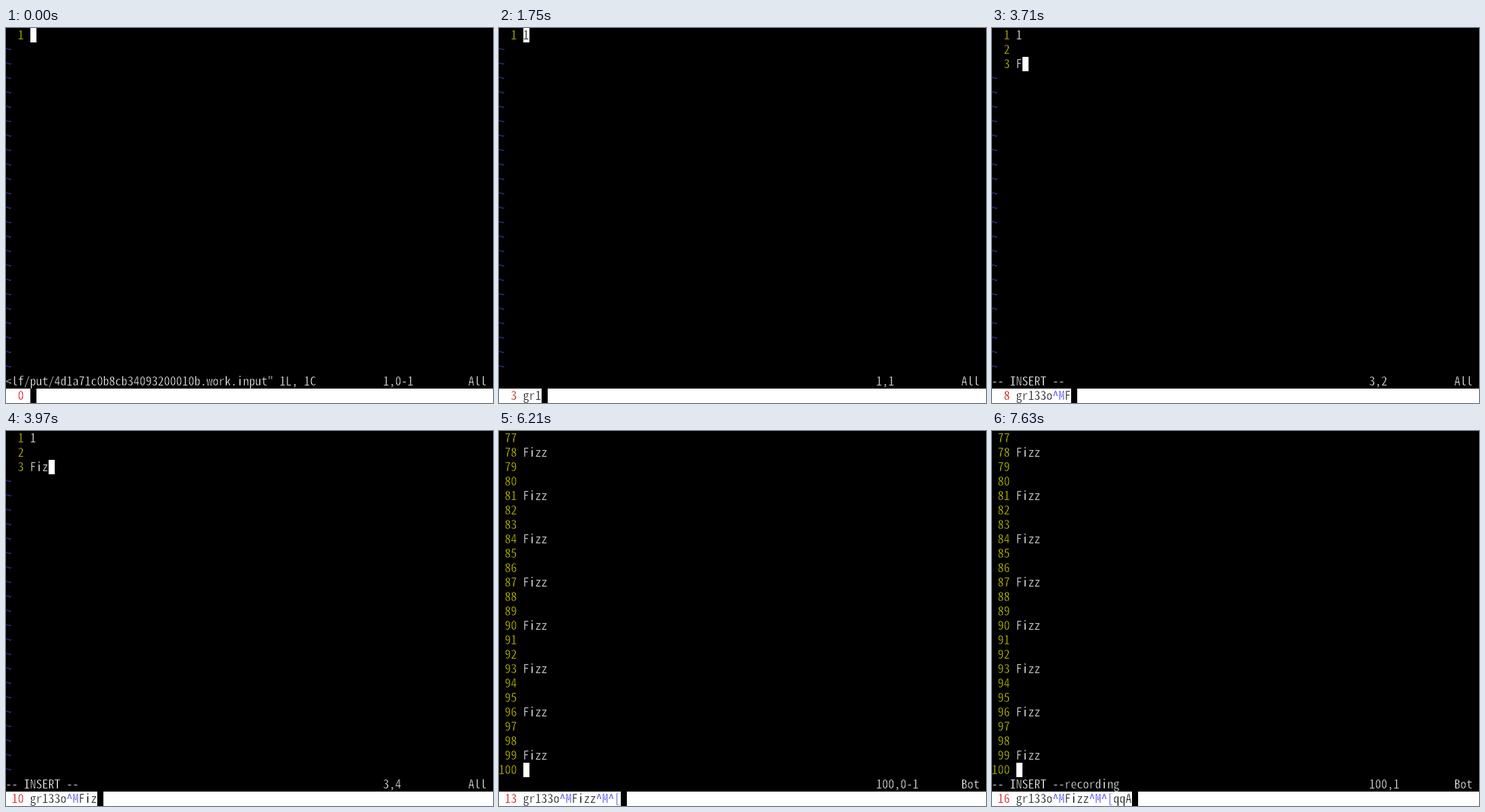
These frames come from a looping animation (640 by 494 pixels, 8 s). An HTML page:

```html
<!DOCTYPE html>
<html lang="en">
<head>
<meta charset="utf-8">
<title>Terminal editor</title>
<style>
  html, body { margin: 0; width: 100%; height: 100%; overflow: hidden; background: #000; }
  svg { display: block; width: 100%; height: 100%; }
  text {
    font: 16px "Noto Sans Mono CJK JP", "Noto Sans Mono", "DejaVu Sans Mono", monospace;
    font-size-adjust: ch-width 0.5;
    font-variant-ligatures: none;
    white-space: pre;
    stroke-width: 0.4px; /* stroked in the paper colour to thin the letters */
  }
</style>
</head>
<body>
<svg id="screen" viewBox="0 0 640 494"></svg>
<script>
const LOOP = 8000, CELL_W = 8, CELL_H = 19, INSET = -0.5, BASELINE = 15;
const BUFFER_ROWS = 24, STATUS_ROW = 24, KEY_ROW = 25, TEXT_COL = 4;
const WHITE = '#fff', BLACK = '#000', YELLOW = '#cdcd00', RED = '#cd0000',
      BLUE = '#0000ee', TILDE = '#5c5cff';

const KEYS = ['g', 'r', '1', '3', '3', 'o', '^M', 'F', 'i', 'z', 'z', '^M', '^[', 'q', 'q', 'A'];
const FILE = '<lf/put/4d1a71c0b8cb34093200010b.work.input" 1L, 1C';
const INSERT = '-- INSERT --';

// time, keys typed, line count, text of last line, message, pending command, position
const STEPS = [
  [0, 0, 1, '', FILE, '', '1,0-1'],
  [1270, 1, 1, '', FILE, 'g', '1,0-1'],
  [1560, 2, 1, '', FILE, 'gr', '1,0-1'],
  [1750, 3, 1, '1', '', '', '1,1'],
  [2120, 4, 1, '1', '', '3', '1,1'],
  [2310, 5, 1, '1', '', '33', '1,1'],
  [2710, 6, 2, '', INSERT, '', '2,1'],
  [3300, 7, 3, '', INSERT, '', '3,1'],
  [3710, 8, 3, 'F', INSERT, '', '3,2'],
  [3850, 9, 3, 'Fi', INSERT, '', '3,3'],
  [3970, 10, 3, 'Fiz', INSERT, '', '3,4'],
  [4170, 11, 3, 'Fizz', INSERT, '', '3,5'],
  [4800, 12, 4, '', INSERT, '', '4,1'],
  [5200, 13, 4, '', '', '^[', ''],
  [6210, 13, 100, '', '', '', '100,0-1'],
  [7030, 14, 100, '', '', 'q', '100,0-1'],
  [7220, 15, 100, '', 'recording', '', '100,0-1'],
  [7630, 16, 100, '', INSERT + 'recording', '', '100,1']
];

const screen = document.getElementById('screen');

function add(tag, attrs, content = '') {
  const node = document.createElementNS(screen.namespaceURI, tag);
  for (const name in attrs) node.setAttribute(name, attrs[name]);
  node.textContent = content;
  screen.append(node);
}

function block(col, row, cols, fill) {
  add('rect', { x: col * CELL_W, y: row * CELL_H, width: cols * CELL_W, height: CELL_H, fill });
}

function print(col, row, string, fill = WHITE, paper = BLACK) {
  if (!string) return;
  const x = Array.from(string, (_, i) => (col + i) * CELL_W + INSET).join(' ');
  add('text', { x, y: row * CELL_H + BASELINE, fill, stroke: paper }, string);
}

function lineText(n) {
  if (n === 1) return '1';
  return n % 3 ? '' : 'Fizz';
}

function drawBuffer(count, lastText) {
  const top = Math.max(1, count - BUFFER_ROWS + 1);
  for (let row = 0; row < BUFFER_ROWS; row++) {
    const n = top + row;
    if (n > count) {
      print(0, row, '~', TILDE);
      continue;
    }
    print(0, row, String(n).padStart(3), YELLOW);
    if (n < count) {
      print(TEXT_COL, row, lineText(n));
      continue;
    }
    // On the first line the cursor sits on the text, later it follows it.
    const onText = n === 1;
    block(TEXT_COL + (onText ? 0 : lastText.length), row, 1, WHITE);
    print(TEXT_COL, row, lastText, ...(onText ? [BLACK, WHITE] : [WHITE, BLACK]));
  }
}

function drawStatus(message, command, position, count) {
  print(0, STATUS_ROW, message);
  print(52, STATUS_ROW, command);
  print(62, STATUS_ROW, position);
  if (position) print(76, STATUS_ROW, count > BUFFER_ROWS ? 'Bot' : 'All');
}

function drawKeys(typed) {
  block(0, KEY_ROW, 80, WHITE);
  print(0, KEY_ROW, String(typed).padStart(3), RED, WHITE);
  let col = TEXT_COL;
  for (const key of KEYS.slice(0, typed)) {
    print(col, KEY_ROW, key, key.length > 1 ? BLUE : BLACK, WHITE);
    col += key.length;
  }
  block(col, KEY_ROW, 1, BLACK);
}

function render([, typed, count, lastText, message, command, position]) {
  screen.replaceChildren();
  block(0, 0, 80, BLACK);
  drawBuffer(count, lastText);
  drawStatus(message, command, position, count);
  drawKeys(typed);
}

const start = performance.now();
let shown;

function tick() {
  const time = (performance.now() - start) % LOOP;
  const step = STEPS.findLast(([at]) => at <= time);
  if (step !== shown) render(shown = step);
  requestAnimationFrame(tick);
}
tick();
</script>
</body>
</html>
```
